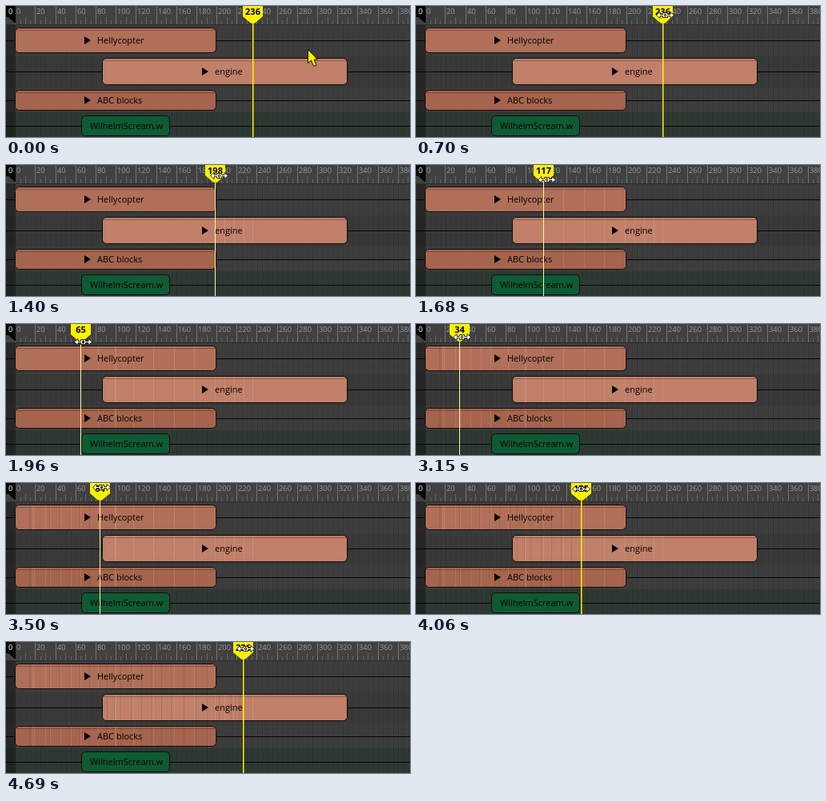
These frames come from a looping animation (505 px wide and 164 px high, 6.79 s). An HTML page:

```html
<!DOCTYPE html>
<html lang="en">
<head>
<meta charset="utf-8">
<title>Timeline scrubbing</title>
<style>
  html, body { margin: 0; width: 100%; height: 100%; overflow: hidden; background: #3b3b3b; }
  svg { display: block; width: 505px; height: 164px; }
  text { font-family: "Open Sans", "Noto Sans", sans-serif; font-size: 11px; }
  .mark { font-size: 9.4px; fill: #9a9a9a; }
  .count { font-size: 11px; font-weight: 700; text-anchor: middle; }
</style>
</head>
<body>
<svg id="stage" viewBox="0 0 505 164">
  <defs>
    <pattern id="grid" width="6.295" height="164" patternUnits="userSpaceOnUse" x="11.8">
      <path d="M.5 0V164" stroke="#000" stroke-opacity=".14"/>
      <path d="M3.5 0V164" stroke="#000" stroke-opacity=".07"/>
    </pattern>
    <clipPath id="inClips"></clipPath>
  </defs>
  <rect width="505" height="164" fill="#3e3e3e"/>
  <rect y="63" width="505" height="39" fill="#3a3a3a"/>
  <rect y="133" width="505" height="31" fill="#2f3a34"/>
  <rect y="24" width="505" height="140" fill="url(#grid)"/>
  <rect width="12" height="164" fill="#000" fill-opacity=".35"/>
  <path d="M0 43.5H505M0 82.5H505M0 118.5H505M0 150.5H505" stroke="#050505"/>
  <rect width="505" height="24" fill="#414141"/>
  <g id="ruler"></g>
  <path d="M0 23.5H505" stroke="#2b2b2b"/>
  <path d="M0 0H12V22L3 14H0Z" fill="#050505"/>
  <text x="3" y="10" style="font-size: 9.4px" fill="#fff">0</text>
  <g id="clips"></g>
  <g id="trails" clip-path="url(#inClips)"></g>
  <g id="labels"></g>
  <g id="playhead">
    <rect id="line" y="20" width="1" height="144"/>
    <path d="M-12 0H13V13L3 21.5H-2L-12 13Z" fill="#fff000"/>
    <text id="count" class="count" x=".5" y="11"></text>
  </g>
  <path id="arrow" d="M0 0V17L4 13.5L7 21L10.5 19.5L7.5 12.5H12Z" fill="#fff000" stroke="#111"/>
  <path id="resize" d="M-11 0L-6.500 -4V-1H-3V-3H3V-1H6.500V-4L11 0L6.500 4V1H3V3H-3V1H-6.500V4Z M-1 -1.500V1.500H1V-1.500Z"
        fill="#fff" stroke="#000" stroke-width=".8"/>
</svg>
<script>
const LOOP = 6790, STEP = 70;
const $ = id => document.getElementById(id);
const frameX = frame => 11.8 + frame * 1.259;

function add(parent, tag, attrs, text) {
  const el = document.createElementNS("http://www.w3.org/2000/svg", tag);
  for (const name in attrs) el.setAttribute(name, attrs[name]);
  if (text !== undefined) el.textContent = text;
  return parent.appendChild(el);
}

for (let f = 0; f <= 390; f += 5) {
  const x = Math.floor(frameX(f)) + .5;
  const top = f % 20 === 0 ? 1 : f % 10 === 0 ? 14 : 18;
  add($("ruler"), "path", { d: `M${x} ${top}V23`, stroke: f % 20 ? "#636363" : "#747474" });
  if (f % 20 === 0) add($("ruler"), "text", { class: "mark", x: x + 1.5, y: 10 }, f);
}

const clips = [
  { name: "Hellycopter", x: 12, y: 28, w: 250, h: 30, fill: "#b06f59", tx: 114 },
  { name: "engine", x: 121, y: 66, w: 305, h: 32, fill: "#c0806a", tx: 261 },
  { name: "ABC blocks", x: 12, y: 106, w: 250, h: 24, fill: "#a5644e", tx: 114 },
  { name: "WilhelmScream.w", x: 95, y: 138, w: 109, h: 24, fill: "#0e5b34", tx: 105, plain: true }
];
for (const c of clips) {
  const box = { x: c.x - .5, y: c.y - .5, width: c.w + 1, height: c.h + 1, rx: 5 };
  const mid = c.y + c.h / 2;
  add($("clips"), "rect", { ...box, fill: c.fill, stroke: "#100c0a" });
  add($("labels"), "text", { x: c.tx, y: mid + 4 }, c.name);
  if (c.plain) continue;
  add($("clips"), "path", { d: `M${c.x + 1} ${c.y + 2.5}H${c.x + c.w - 1}`, stroke: "#000", "stroke-opacity": .25 });
  add($("inClips"), "rect", { ...box, y: c.y, height: c.h });
  add($("labels"), "path", { d: `M${c.tx - 16} ${mid - 5}l8 5l-8 5Z` });
}

// time, playhead frame, pointer offset from playhead, pointer y
const keys = [
  [0, 236, 69, 54], [700, 236, 3, 11], [1120, 236, 3, 11], [1400, 198, 5, 13],
  [1680, 117, 4, 18], [1750, 100, 3, 19], [1820, 99, 3, 20], [1960, 65, 3, 22],
  [2170, 35, 3, 22], [2380, 19, 3, 22], [2520, 15, 3, 22], [2870, 15, 3, 22],
  [2940, 14, 3, 22], [3010, 14, 3, 20], [3500, 84, 2, 5], [3710, 105, 1, 6],
  [4060, 155, 0, 7], [4410, 214, 2, 8], [4550, 222, 3, 8], [4690, 226, 3, 8],
  [LOOP, 226, 3, 8]
];

function pose(time) {
  const i = keys.findIndex(k => k[0] > time);
  const a = keys[i - 1], b = keys[i];
  const p = (time - a[0]) / (b[0] - a[0]);
  const [, frame, dx, y] = a.map((v, n) => v + (b[n] - v) * p);
  const whole = Math.round(frame);
  return { frame: whole, x: Math.floor(frameX(whole)), dx, y };
}

// Faint marks stay where the playhead has passed.
const trails = [];
for (let t = 1190; t <= 4690; t += STEP) {
  const { x } = pose(t - STEP);
  if (x === pose(t).x) continue;
  const back = t < 2900;
  const el = add($("trails"), "rect", {
    x, y: 24, width: 1, height: 140,
    fill: back ? "#ffe0c0" : "#4a4a20", "fill-opacity": back ? .14 : .2
  });
  trails.push({ t, el });
}

function place(el, x, y) {
  el.setAttribute("transform", `translate(${x} ${y})`);
}

function draw(now) {
  const t = Math.floor(now % LOOP / STEP) * STEP;
  const { frame, x, dx, y } = pose(t);
  const onHandle = dx < 14;
  const pale = t >= 1190 && t < 2520 || t >= 2940 && t < 3780;
  place($("playhead"), x, 0);
  $("count").textContent = frame;
  $("line").setAttribute("fill", pale ? "#fbf5a4" : "#fff000");
  $("line").setAttribute("width", pale ? 1 : 1.5);
  for (const id of ["arrow", "resize"]) {
    place($(id), Math.round(x + dx) + .5, Math.round(y) + .5);
    $(id).style.display = (id === "resize") === onHandle ? "" : "none";
  }
  for (const trail of trails) trail.el.style.display = t >= trail.t ? "" : "none";
}

const start = performance.now();
function tick() {
  draw(performance.now() - start);
  requestAnimationFrame(tick);
}
tick();
</script>
</body>
</html>
```
